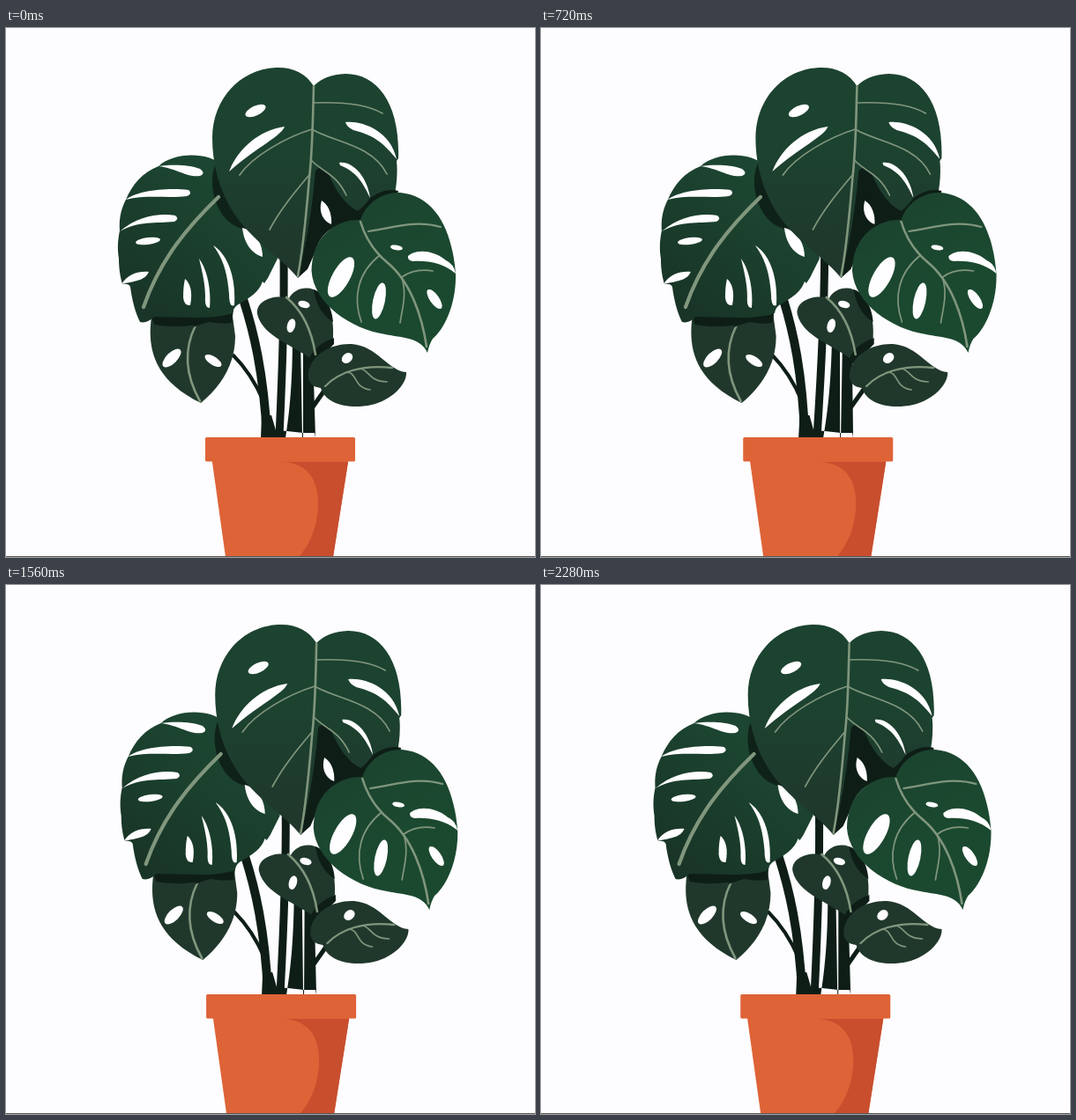
Animation of 600x601 px, one loop 2320 ms. Source, as an HTML page:

```html
<!DOCTYPE html>
<html lang="en">
<head>
<meta charset="utf-8">
<title>Swaying plant</title>
<style>
html, body { margin: 0; width: 100%; height: 100%; overflow: hidden; background: #fdfcfe; }
svg { display: block; width: 100vw; height: 100vh; }
.hole { fill: #fefdff; }
.dark { fill: #0e1e17; }
.vein { fill: none; stroke: #80967d; stroke-width: 1.7; stroke-linecap: round; stroke-linejoin: round; }
.rib { stroke-width: 2.6; }
.stem { fill: none; stroke: #0e1e17; }
</style>
</head>
<body>
<svg viewBox="0 0 600 601" preserveAspectRatio="none">
<defs>
  <linearGradient id="topFill" x2="0" y2="1"><stop offset=".35" stop-color="#1c4330"/><stop offset="1" stop-color="#20362b"/></linearGradient>
  <linearGradient id="leftFill" x1="1" x2=".3" y2="1"><stop offset=".3" stop-color="#1c4631"/><stop offset="1" stop-color="#193527"/></linearGradient>
  <linearGradient id="rightFill" x2=".6" y2="1"><stop offset="0" stop-color="#1c422f"/><stop offset=".7" stop-color="#1b4930"/></linearGradient>
</defs>

<g id="stems" class="stem">
  <path stroke-width="10" d="M269 308C281 345 292 390 296 464"/>
  <path stroke-width="4" d="M257 371C273 387 284 405 292 424"/>
  <path stroke-width="9" d="M315 258C316 330 313 400 310 464"/>
  <path stroke-width="5" d="M363 409L347 432"/>
  <path class="dark" stroke="none" d="M325 350H334L336 466H317C322 435 325 400 325 350ZM337 366H348L351 466H337ZM290 440L289 466H351L350 460H337L319 458L306 457L301 440Z"/>
</g>

<g data-sway="7.8">
  <path fill="#20382c" d="M165 328C161 358 163 398 221 426C246 405 260 380 260 350L256 320Z"/>
  <path class="dark" d="M165 328L168 337C190 341 212 339 230 334Q245 337 256 335L258 320Z"/>
  <path class="vein rib" d="M215 338C203 362 201 390 220 424"/>
  <path class="dark" d="M212 340L221 324H235L228 334Z"/>
  <ellipse class="hole" cx="188" cy="375" rx="6.2" ry="13.5" transform="rotate(45 188 375)"/>
  <ellipse class="hole" cx="235" cy="378" rx="4.8" ry="10.8" transform="rotate(-58 235 378)"/>
</g>

<g data-sway="6.7">
  <path fill="#20382c" d="M321 307C328 294 345 292 356 301C369 313 372 335 371 352L350 379C328 361 291 351 285 325C283 311 302 302 321 307Z"/>
  <path class="dark" d="M349 297C351 313 359 327 371 334C370 319 363 303 349 297ZM342 380Q349 360 372 352V359L350 382Z"/>
  <path class="vein rib" d="M318 306C336 321 347 345 351 371"/>
  <ellipse class="hole" cx="338" cy="314" rx="6.8" ry="4" transform="rotate(15 338 314)"/>
  <ellipse class="hole" cx="323.5" cy="338" rx="4.6" ry="8" transform="rotate(15 323 338)"/>
</g>

<g data-sway="9.3">
  <path fill="url(#leftFill)" d="M246 156C228 140 190 141 173 157C155 164 143 178 136 195C130 206 128 219 129 230C127 240 126 250 128 262C128 275 130 284 132 291Q139 290 141 294C143 310 147 324 152 334Q160 336 168 328C200 328 235 332 257 324Q258 318 262 315C277 306 287 300 291 288L293 290L297 284L308 262L300 200Z"/>
  <path class="dark" opacity=".9" d="M240 150C231 165 232 190 243 208C250 221 262 228 274 229L290 200L252 150Z"/>
  <path class="vein" style="stroke-width:4.2" d="M241 192C207 225 175 262 156 317"/>
  <path class="hole" d="M173 157C188 155 207 155 220 160Q227 165 220 168C205 170 195 160 173 157ZM136 195C148 185 182 181 207 184Q212 188 205 191C185 194 160 189 136 195ZM129 231C150 213 175 210 192 213Q197 217 191 220C170 222 150 219 129 231ZM131 291C138 280 150 276 162 277C158 286 150 287 131 291ZM268 227C280 230 291 241 291 260C280 257 270 246 268 227ZM219 262C228 274 233 297 231 318Q225 318 226 305C226 290 222 275 219 262ZM235 247C251 257 261 282 259 315Q253 318 253 302C251 277 246 262 235 247Z"/>
  <ellipse class="hole" cx="161" cy="242" rx="14" ry="4" transform="rotate(-7 161 242)"/>
  <path class="hole" d="M203 285C209 290 212 300 209 315Q202 316 201 306Q201 294 203 285Z"/>
</g>

<g data-sway="11">
  <path fill="url(#topFill)" d="M349 66C340 51 324 44 306 45C264 47 234 82 234 125C234 166 249 204 274 230C292 250 317 266 331 284C343 272 345 245 350 232L395 212L440 194Q445 170 443 151L445 148C447 87 422 52 385 52Q361 53 349 66Z"/>
  <path class="dark" d="M351 162Q359 154 366 166C374 186 386 202 399 208Q406 203 413 193Q430 181 445 185L440 205L402 222L374 226Q357 232 350 256L342 274L331 284Q346 224 351 162Z"/>
  <path class="vein rib" d="M349 66C348 100 348 135 344 170C341 205 338 245 331 282"/>
  <path class="vein" d="M349 85C375 84 407 85 427 97M347 115C369 129 416 132 432 166M346 150C358 163 374 165 386 190M347 115C318 124 280 145 265 167M343 168C328 186 311 206 299 229"/>
  <path class="hole" d="M253 163C262 139 286 116 316 112C312 123 285 135 253 163ZM385 107C403 105 436 116 443 149C430 133 419 122 394 116Q386 112 385 107ZM378 153C394 151 410 170 413 193C406 178 398 163 379 156ZM358 196C366 201 370 212 369 223C360 220 354 209 358 196Z"/>
  <ellipse class="hole" cx="283" cy="94" rx="12.5" ry="5.4" transform="rotate(-25 283 94)"/>
</g>

<g data-sway="7.6">
  <path fill="url(#rightFill)" d="M402 218C409 197 429 186 447 187C487 191 506 229 510 279C511 312 498 341 484 353Q480 359 478 369C470 351 449 352 430 348C391 342 349 313 346.500 276C347 237 374 217 402 218Z"/>
  <path class="vein rib" d="M402 220C408 240 420 256 432 266C459 288 472 328 477 362"/>
  <path class="vein rib" style="stroke-width:2.2" d="M411 231C436 228 463 217 493 226"/>
  <path class="vein" d="M424 258C399 278 393 306 403 334M449 283C460 275 472 274 484 276M449 284C455 303 449 320 447 335"/>
  <path class="hole" d="M456 259C468 249 489 255 499 264Q508 268 510 279C497 268 480 264 462 265Q455 264 456 259Z"/>
  <ellipse class="hole" cx="380" cy="283" rx="10" ry="25.5" transform="rotate(29 380 283)"/>
  <ellipse class="hole" cx="423" cy="310" rx="6.8" ry="21" transform="rotate(12 423 310)"/>
  <ellipse class="hole" cx="486" cy="308" rx="5.2" ry="13" transform="rotate(-35 486 308)"/>
  <ellipse class="hole" cx="443" cy="249.5" rx="7" ry="2.9" transform="rotate(10 443 249)"/>
</g>

<g data-sway="8.4">
  <path fill="#20382c" d="M343 391C347 370 370 358 392 359C421 361 434 390 454 391C455 405 437 423 415 428C389 434 362 427 357 409Q341 407 343 391Z"/>
  <path class="vein rib" style="stroke-width:2.3" d="M362 407C377 391 404 382 438 386"/>
  <path class="vein" d="M386 391C399 391 393 408 413 411M402 387C411 388 412 402 432 402"/>
  <ellipse class="hole" cx="387" cy="375" rx="6.8" ry="5.3" transform="rotate(-40 387 375)"/>
</g>

<g data-sway="3.8">
  <path fill="#de6337" d="M233.500 490H388.500L371 601H249Z"/>
  <path fill="#c84e2e" d="M309 493H388L371 601H332C344 588 354 566 354 540C354 508 337 492 309 493Z"/>
  <rect fill="#de6337" x="226" y="465" width="170" height="27.5" rx="1.5"/>
</g>
<rect fill="#5b5656" y="600" width="600" height="1"/>
</svg>

<script>
const LOOP = 2320, STEP = 40;
// [time, sway]: eased between turning points
const turns = [[0, 0], [960, 1], [1950, -.07], [LOOP, .065]];
const parts = document.querySelectorAll("[data-sway]");
const stems = document.getElementById("stems");

function sway(t) {
  const i = turns.findIndex(turn => turn[0] > t);
  const [t0, a] = turns[i - 1], [t1, b] = turns[i];
  return a + (b - a) * (1 - Math.cos(Math.PI * (t - t0) / (t1 - t0))) / 2;
}

function draw(now) {
  const s = sway(Math.floor(now % LOOP / STEP) * STEP);
  for (const part of parts)
    part.setAttribute("transform", `translate(${s * part.dataset.sway})`);
  // stems lean from the soil line at y = 466
  const lean = .02 * s;
  stems.setAttribute("transform", `matrix(1 0 ${-lean} 1 ${3.6 * s + lean * 466} 0)`);
  requestAnimationFrame(draw);
}
draw(0);
</script>
</body>
</html>
```
